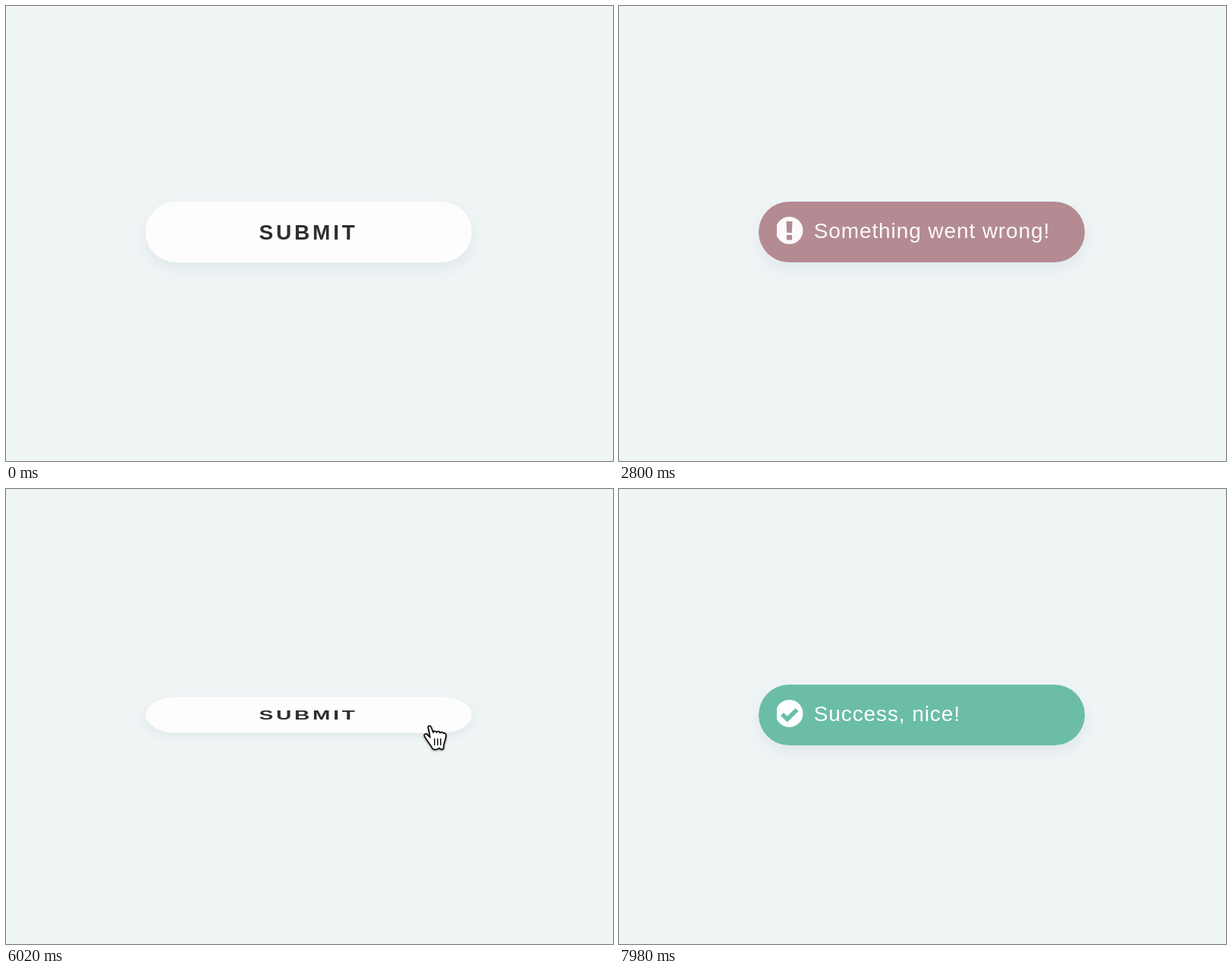
An HTML page for the animation above (8 s loop, 800x600 px).

```html
<!DOCTYPE html>
<html lang="en">
<head>
<meta charset="utf-8">
<title>Submit button</title>
<style>
  html, body { margin: 0; width: 100%; height: 100%; overflow: hidden; background: #eff4f5; }
  svg { display: block; width: 800px; height: 600px; }
  text { font-family: "Liberation Sans", Arial, sans-serif; font-size: 28px; }
  .pill { fill: #fff; filter: drop-shadow(0 8px 9px rgba(40, 80, 85, .07)); }
  .label { font-weight: bold; letter-spacing: 3.8px; fill: #2c2e31; }
  .message { letter-spacing: .9px; fill: #fff; }
</style>
</head>
<body>
<svg viewBox="0 0 800 600">
  <defs>
    <clipPath id="round"><rect x="184" y="258" width="430" height="80" rx="40"/></clipPath>
    <clipPath id="badge"><rect x="208" y="276" width="36" height="40"/></clipPath>
  </defs>

  <g id="front">
    <rect class="pill" x="184" y="258" width="430" height="80" rx="40" style="fill:#fefdfd"/>
    <text class="label" x="333.6" y="308">SUBMIT</text>
  </g>

  <g id="back">
    <rect class="pill" x="184" y="258" width="430" height="80" rx="40"/>
    <g clip-path="url(#round)"><rect id="fill" x="184" y="257" width="0" height="82"/></g>
    <g id="note">
      <circle cx="224.5" cy="296" r="18" fill="#fff" clip-path="url(#badge)"/>
      <path id="bang" d="M220.5 284H228.5L227.8 299H221.2ZM221 302H228V308.5H221Z"/>
      <path id="tick" d="M215 297L221.8 303.6L234.6 291" fill="none" stroke-width="5.6"/>
      <text id="message" class="message" x="256.7" y="306.3"></text>
    </g>
  </g>

  <g id="cursor" style="filter:drop-shadow(0 1.5px 1.5px rgba(0,0,0,.35))">
    <g id="hand" stroke="#111" stroke-width="1.8" stroke-linejoin="round" stroke-linecap="round">
      <path fill="#fff" transform="translate(-9 -2)" d="M6.4 3.2C6 1 9.6 .6 10.4 3L13 10C13.6 7.6 16.8 7.8 17.4 10C18.6 7.8 21.4 8.4 22 10.6C23.4 9 26 9.4 26.4 11.4C28 10.2 30 11.4 30 13.6C30 18 28.6 21 27.6 24C26.8 26.4 26.8 28.4 26.6 31.4C25 33.4 22.6 32.4 21 30.6C18.6 33 14 33.4 12 31.4C11 28.6 7.4 24.4 5 20.6C3.4 17.8 1.4 16 1.2 13.8C1.4 11.8 4 11.4 5.4 13L9 16.6Z"/>
      <path fill="none" stroke-width="1.5" d="M5.8 16.5V24.5M9.8 16.5V24.5M13.8 16.5V24.5"/>
    </g>
    <path id="arrow" fill="#111" stroke="#fff" stroke-width="1.8" d="M0 0V26L6 20.5L10 29.5L14.5 27.5L10.7 19H19Z"/>
  </g>
</svg>

<script>
const LOOP = 8000, FLIP = 800, TINT = 900, FADE = 250;
const GREY = [163, 178, 179];
const el = id => document.getElementById(id);
const clamp = v => Math.min(1, Math.max(0, v));
const mix = (a, b, k) => a + (b - a) * k;

// cubic-bezier(.25, .1, .25, 1)
function ease(x) {
  if (x <= 0 || x >= 1) return clamp(x);
  const curve = (a, b, s) => 3 * a * s * (1 - s) ** 2 + 3 * b * s * s * (1 - s) + s ** 3;
  let lo = 0, hi = 1;
  for (let i = 0; i < 24; i++) {
    const mid = (lo + hi) / 2;
    if (curve(.25, .25, mid) < x) lo = mid; else hi = mid;
  }
  return curve(.1, 1, lo);
}
const phase = (t, start, span) => ease((t - start) / span);

const runs = [
  { click: 454, load: 1170, span: 1580, done: 2610, reset: 3936,
    tint: [217, 57, 77], text: "Something went wrong!", icon: "bang" },
  { click: 5860, load: 6576, span: 1180, done: 7640, reset: Infinity,
    tint: [77, 195, 161], text: "Success, nice!", icon: "tick" }
];

// Pointer visits: enter, rest on the button, leave
const visits = [
  { enter: 320, rest: 410, leave: 640, gone: 840, from: [780, 337] },
  { enter: 5300, rest: 5680, leave: 6040, gone: 6260, from: [790, 333] }
];
const SPOT = [559, 313], EXIT = [758, 319];

function drawButton(t) {
  const run = t < 5000 ? runs[0] : runs[1];
  const turn = phase(t, run.click, FLIP) - phase(t, run.reset, FLIP);
  const tilt = Math.cos(Math.PI * turn);
  const squash = Math.max(.002, Math.abs(tilt));
  const face = `translate(0 298) scale(1 ${squash}) translate(0 -298)`;

  for (const id of ["front", "back"]) {
    el(id).setAttribute("transform", face);
    el(id).style.display = (id === "front") === (tilt >= 0) ? "" : "none";
  }

  const k = phase(t, run.done, TINT);
  const color = `rgb(${GREY.map((c, i) => Math.round(mix(c, run.tint[i], k)))})`;
  el("fill").setAttribute("width", 430 * phase(t, run.load, run.span));
  el("fill").setAttribute("fill", color);

  el("note").style.opacity = phase(t, run.done, FADE);
  el("message").textContent = run.text;
  el("bang").setAttribute("fill", color);
  el("tick").setAttribute("stroke", color);
  for (const id of ["bang", "tick"]) el(id).style.display = id === run.icon ? "" : "none";
}

function drawCursor(t) {
  const visit = visits.find(v => t >= v.enter && t < v.gone);
  el("cursor").style.display = visit ? "" : "none";
  if (!visit) return;
  const inward = 1 - (1 - clamp((t - visit.enter) / (visit.rest - visit.enter))) ** 2;
  const outward = clamp((t - visit.leave) / (visit.gone - visit.leave)) ** 2;
  const [x, y] = SPOT.map((s, i) => mix(mix(visit.from[i], s, inward), EXIT[i], outward));
  const over = x < 605;
  el("cursor").setAttribute("transform", `translate(${x} ${y})`);
  el("hand").style.display = over ? "" : "none";
  el("arrow").style.display = over ? "none" : "";
}

const began = performance.now();
function tick() {
  const t = (performance.now() - began) % LOOP;
  drawButton(t);
  drawCursor(t);
  requestAnimationFrame(tick);
}
tick();
</script>
</body>
</html>
```
